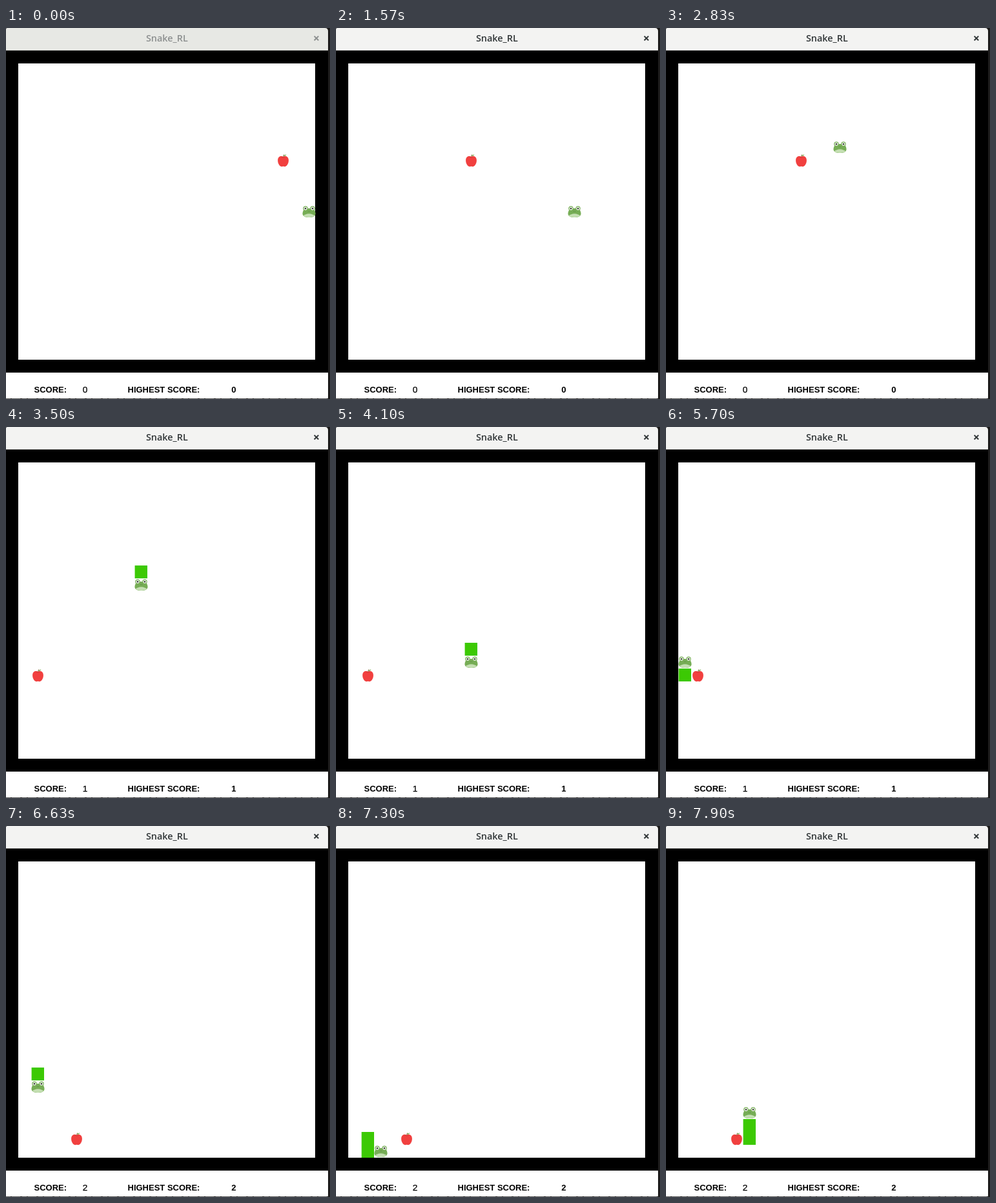
Recreate the animation shown at these times as an HTML page. Size 502x576 px, loop 8000 ms.

```html
<!DOCTYPE html>
<html lang="en">
<head>
<meta charset="utf-8">
<title>Snake_RL</title>
<style>
  html, body { margin: 0; width: 100%; height: 100%; overflow: hidden; background: #1c1b1b; }
  svg { display: block; width: 100vw; height: 100vh; }
  #title { font: 600 14.4px "Open Sans", "Noto Sans", sans-serif; text-anchor: middle; }
  .label, #record { font: bold 13px "Liberation Sans", Arial, sans-serif; }
  #score { font: 13.6px "Liberation Sans", Arial, sans-serif; stroke: #000; stroke-width: .25; }
</style>
</head>
<body>
<svg viewBox="0 0 502 576">
  <rect width="502" height="576" fill="#1c1b1b"/>
  <path id="bar" d="M0 35V2Q0 0 2 0H494Q499 0 499 5V35Z"/>
  <rect id="edge" y="34" width="499" height="1"/>
  <text id="title" x="249.3" y="21">Snake_RL</text>
  <path id="close" d="M477.6 12.6l6.6 6.6m0-6.6l-6.6 6.6" stroke-width="2" fill="none"/>

  <rect y="35" width="499" height="500" fill="#000"/>
  <rect x="19" y="55" width="460" height="460" fill="#fff"/>
  <rect y="535" width="499" height="40" fill="#fff"/>
  <path d="M0 575.5H499" stroke="#555" stroke-dasharray="7 2 13 3"/>

  <text class="label" x="43.5" y="566">SCORE:</text>
  <text id="score" x="118.8" y="566">0</text>
  <text class="label" x="188.5" y="566">HIGHEST SCORE:</text>
  <text id="record" x="349.3" y="566">0</text>

  <g id="body" fill="#3cc904"></g>

  <g id="apple">
    <path d="M10.6 5.2Q10.8 3 12 1.6" fill="none" stroke="#8a6a3c" stroke-width="1.1"/>
    <path d="M11.2 3.9Q12 1.2 15.2 1.4Q14.6 4 11.2 3.9Z" fill="#7db35a"/>
    <path d="M10.5 5C12 3.2 18.9 2.8 18.9 10.4C18.9 16 15.4 20.2 12.8 20.2Q10.5 19.5 8.3 20.2C5.6 20.2 2.1 16 2.1 10.4C2.1 2.8 9 3.2 10.5 5Z" fill="#f1403f"/>
    <path d="M8.2 5.3Q10.5 6.6 12.8 5.3" fill="none" stroke="#c9302f" stroke-width=".8"/>
  </g>

  <g id="frog">
    <g fill="#76ad55">
      <circle cx="5" cy="5.2" r="3.7"/>
      <circle cx="16" cy="5.2" r="3.7"/>
      <path d="M.5 13.2C.5 8 4 5 10.5 5S20.5 8 20.5 13.2C20.5 17 17 19 10.5 19S.5 17 .5 13.2Z"/>
    </g>
    <path d="M1.8 16C4.5 14.8 6.5 13.2 10.5 13.2S16.5 14.8 19.2 16C17.6 18.2 14.5 19 10.5 19S3.4 18.2 1.8 16Z" fill="#c4dfb2"/>
    <g fill="#fff">
      <circle cx="5" cy="5.2" r="2.5"/>
      <circle cx="16" cy="5.2" r="2.5"/>
    </g>
    <g fill="#2f3a2a">
      <circle cx="5" cy="5.2" r="1.3"/>
      <circle cx="16" cy="5.2" r="1.3"/>
      <circle cx="9.3" cy="9.6" r=".4"/>
      <circle cx="11.7" cy="9.6" r=".4"/>
    </g>
  </g>
</svg>
<script>
const LOOP = 8000, FOCUS = 500, RESET = 15, CELL = 20;
const $ = id => document.getElementById(id);
const STEP = { L: [-1, 0], R: [1, 0], U: [0, -1], D: [0, 1] };

// Screen refresh on which each move (or pair of moves) becomes visible.
const MOVES = `16R 18R 20R 21R 23R 25R 26U 28U 29U 31U 32U 34L 36L 39LL 40L 42L 43L 47LL
  48D 50D 52D 53D 55D 56D 58D 59D 61D 63D 64D 66D 69LL 72LL 74L 75L 77L 78L 80L
  82U 83U 85U 87U 88U 91U 92R 94D 95D 97D 98D 99D 101D 102D 104D 106D 107D
  109R 110R 112R 113R 115U 117U 118U`;

const trail = [{ tick: RESET, pos: [12, 11] }];
for (const move of MOVES.split(/\s+/)) {
  const tick = parseInt(move, 10);
  for (const dir of move.replace(/\d+/, "")) {
    const [x, y] = trail[trail.length - 1].pos;
    trail.push({ tick, pos: [x + STEP[dir][0], y + STEP[dir][1]] });
  }
}

const APPLES = [[0, [20, 7]], [RESET, [9, 7]], [48, [1, 16]], [98, [4, 21]]];
const SCORE = [[0, 0], [48, 1], [98, 2]];
const RECORD = [[0, 0], [50, 1], [99, 2]];
const LENGTH = [[0, 0], [50, 1], [101, 2]];

// Refreshes run at 15 per second, on a 10 ms clock.
const tickTime = tick => tick ? Math.round((100 + 200 * tick) / 30) * 10 : 0;
const at = (track, t) => track.filter(([tick]) => tickTime(tick) <= t).pop()[1];
const left = col => 19 + CELL * col;
const top_ = row => 55 + CELL * row;
const place = (id, [col, row]) =>
  $(id).setAttribute("transform", `translate(${left(col)} ${top_(row)})`);
const paint = (id, attr, color) => $(id).setAttribute(attr, color);

const blocks = [0, 1].map(() => {
  const rect = document.createElementNS("http://www.w3.org/2000/svg", "rect");
  rect.setAttribute("width", 19.4);
  rect.setAttribute("height", CELL);
  return $("body").appendChild(rect);
});

function draw(t) {
  const active = t >= FOCUS;
  paint("bar", "fill", active ? "#f3f3f2" : "#e7e8e4");
  paint("edge", "fill", active ? "#d3d3d1" : "#d0d1cd");
  paint("title", "fill", active ? "#2f3436" : "#8c8f8f");
  paint("close", "stroke", active ? "#2f3436" : "#8c8f8f");

  const past = trail.filter(p => tickTime(p.tick) <= t);
  const head = past.length - 1;
  place("frog", head < 0 ? [22, 11] : past[head].pos);
  place("apple", at(APPLES, t));

  const length = at(LENGTH, t);
  blocks.forEach((rect, i) => {
    rect.setAttribute("visibility", i < length ? "visible" : "hidden");
    if (i >= length) return;
    const [col, row] = past[head - 1 - i].pos;
    rect.setAttribute("x", left(col) + .6);
    rect.setAttribute("y", top_(row));
  });

  $("score").textContent = at(SCORE, t);
  $("record").textContent = at(RECORD, t);
}

const start = performance.now();
function frame() {
  draw((performance.now() - start) % LOOP);
  requestAnimationFrame(frame);
}
frame();
</script>
</body>
</html>
```
